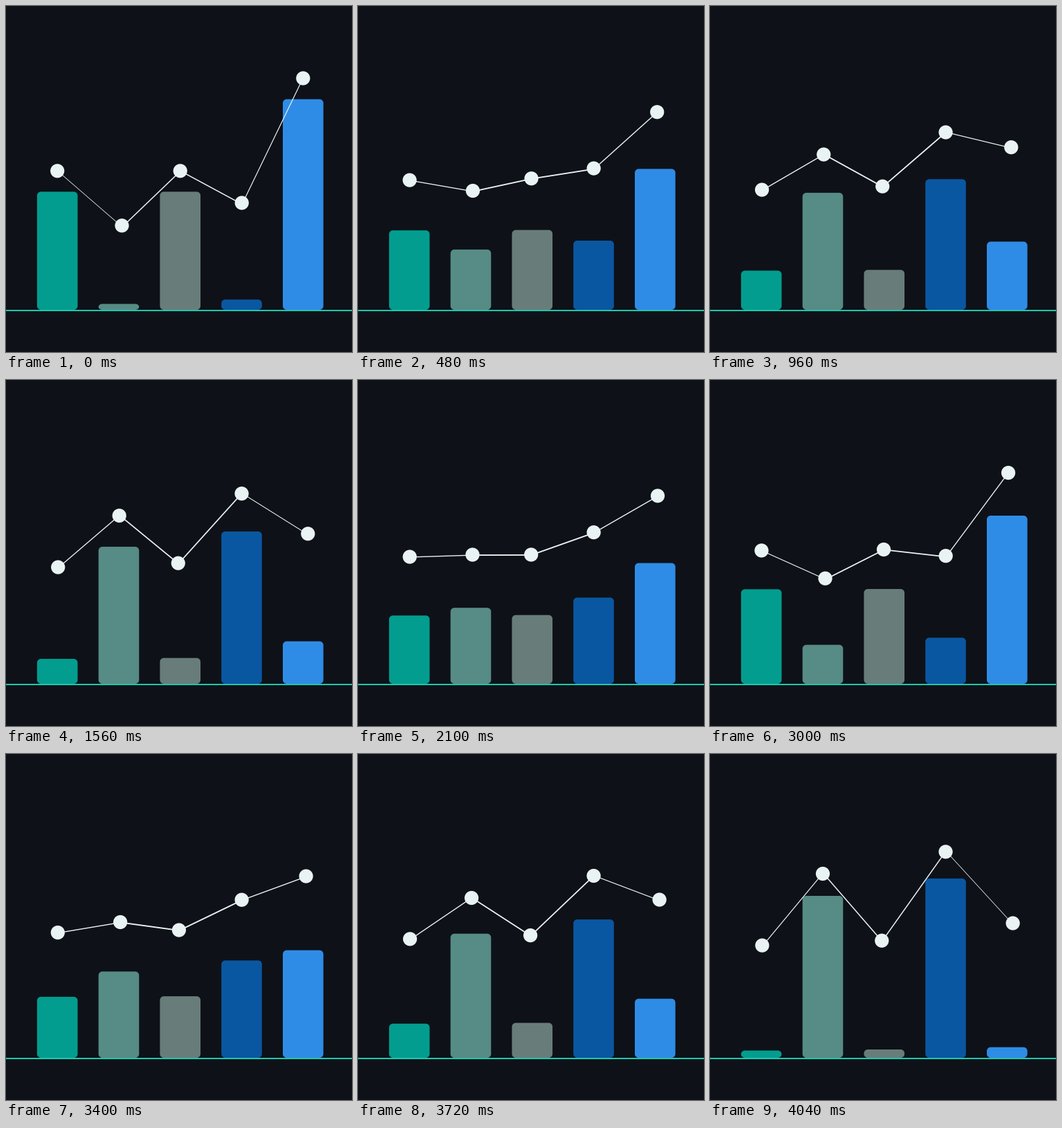
Recreate the animation shown at these times as a matplotlib script. Size 500x500 px, loop 4140 ms.

```python
import matplotlib.pyplot as plt
import numpy as np
from matplotlib.animation import FuncAnimation
from matplotlib.patches import Circle, PathPatch
from matplotlib.path import Path

SIZE, DPI = 500, 100
FRAMES, STEP = 207, 20
PX = 72 / DPI

BG, PALE, AXIS = "#0e1118", "#eaf3f3", "#17cbae"
BASE, BAR_W, PITCH, LEFT = 439, 58.6, 88.78, 44.9
RADIUS, DOT_R = 5.5, 10.1

# Per bar: colour, bar top low/high, dot y low/high, sideways drift of the low dot.
BARS = [("#029d8f", (428.5, 268.4), (276.6, 238.3), 1.2),
        ("#578b85", (430.5, 205.0), (317.3, 173.0), 4.5),
        ("#687d7a", (427.0, 268.4), (269.7, 238.3), -3.5),
        ("#0a57a1", (424.2, 179.9), (284.5, 141.3), 0.2),
        ("#2f8ce6", (423.7, 134.7), (244.5, 104.4), 8.3)]

LINK_W = np.array([0.8, 1.5, 1.5, 1.2])
LINK_SHIFT = (0.4, 0.5)
OVERSHOOT = 0.01


def mix(a, b, t):
    return a + (b - a) * t


def progress(i):
    """Linear there, back and there again."""
    return np.interp(i, [1, 67, 136, 202], [0, 1, 0, 1])


def lift(k, p):
    """Neighbouring bars move in opposite directions."""
    return p if k % 2 else 1 - p


def dot_at(k, t):
    _, _, ys, drift = BARS[k]
    return LEFT + PITCH * k + BAR_W / 2 + drift * (1 - t), mix(*ys, t)


def rounded(x, top, w, bottom):
    """Rectangle with elliptical corners, flattened when the bar is low."""
    rx, ry = RADIUS, min(RADIUS, (bottom - top) / 2)
    cx, cy, k = x + w / 2, (top + bottom) / 2, 0.4477
    verts = []
    for sx, sy in [(-1, -1), (1, -1), (1, 1), (-1, 1)]:
        px, py = cx + sx * w / 2, cy + sy * (bottom - top) / 2
        side = [(px, py - sy * ry), (px, py - sy * ry * k)]
        flat = [(px - sx * rx * k, py), (px - sx * rx, py)]
        corner = side + flat
        verts += corner if sx * sy > 0 else corner[::-1]
    return verts


def bar_path(x, top, w, bottom):
    # Corners run top left, top right, bottom right, bottom left.
    verts = rounded(x, top, w, bottom)
    ordered = []
    for n in range(0, 16, 4):
        ordered += verts[n:n + 4] if n in (0, 8) else verts[n:n + 4]
    if ordered[0][1] < ordered[3][1]:
        ordered = [v for n in range(0, 16, 4) for v in ordered[n:n + 4][::-1]]
    codes = ([Path.LINETO] + [Path.CURVE4] * 3) * 4
    codes[0] = Path.MOVETO
    return Path(ordered + [ordered[0]], codes + [Path.CLOSEPOLY])


fig = plt.figure(figsize=(SIZE / DPI, SIZE / DPI), dpi=DPI, facecolor=BG)
ax = fig.add_axes([0, 0, 1, 1])
ax.set(xlim=(0, SIZE), ylim=(SIZE, 0))
ax.axis("off")

ax.plot([0, SIZE], [440, 440], color=AXIS, lw=2 * PX, snap=False, zorder=1)
bars = [ax.add_patch(PathPatch(Path([(0, 0)]), fc=bar[0], lw=0, snap=False, zorder=2))
        for bar in BARS]
links = [ax.plot([], [], color=PALE, snap=False, zorder=3)[0] for _ in LINK_W]
dots = [ax.add_patch(Circle((0, 0), DOT_R, fc=PALE, lw=0, zorder=4)) for _ in BARS]


def draw(i):
    p = progress(i)
    joints = []
    for k, (bar, dot) in enumerate(zip(bars, dots)):
        t = lift(k, p)
        bar.set_path(bar_path(LEFT + PITCH * k, mix(*BARS[k][1], t), BAR_W, BASE))
        dot.center = dot_at(k, t)
        # The line swings slightly wider than the dots.
        joints.append(np.add(dot_at(k, t + OVERSHOOT * (2 * t - 1)), LINK_SHIFT))

    widths = mix(LINK_W, LINK_W[::-1], p) + 0.4 * np.sin(np.pi * p)
    for link, a, b, w in zip(links, joints, joints[1:], widths):
        link.set_data(*zip(a, b))
        link.set_linewidth(w * PX)
    return [*bars, *links, *dots]


anim = FuncAnimation(fig, draw, frames=FRAMES, interval=STEP, repeat=True,
                     repeat_delay=0, blit=False)
plt.show()
```
